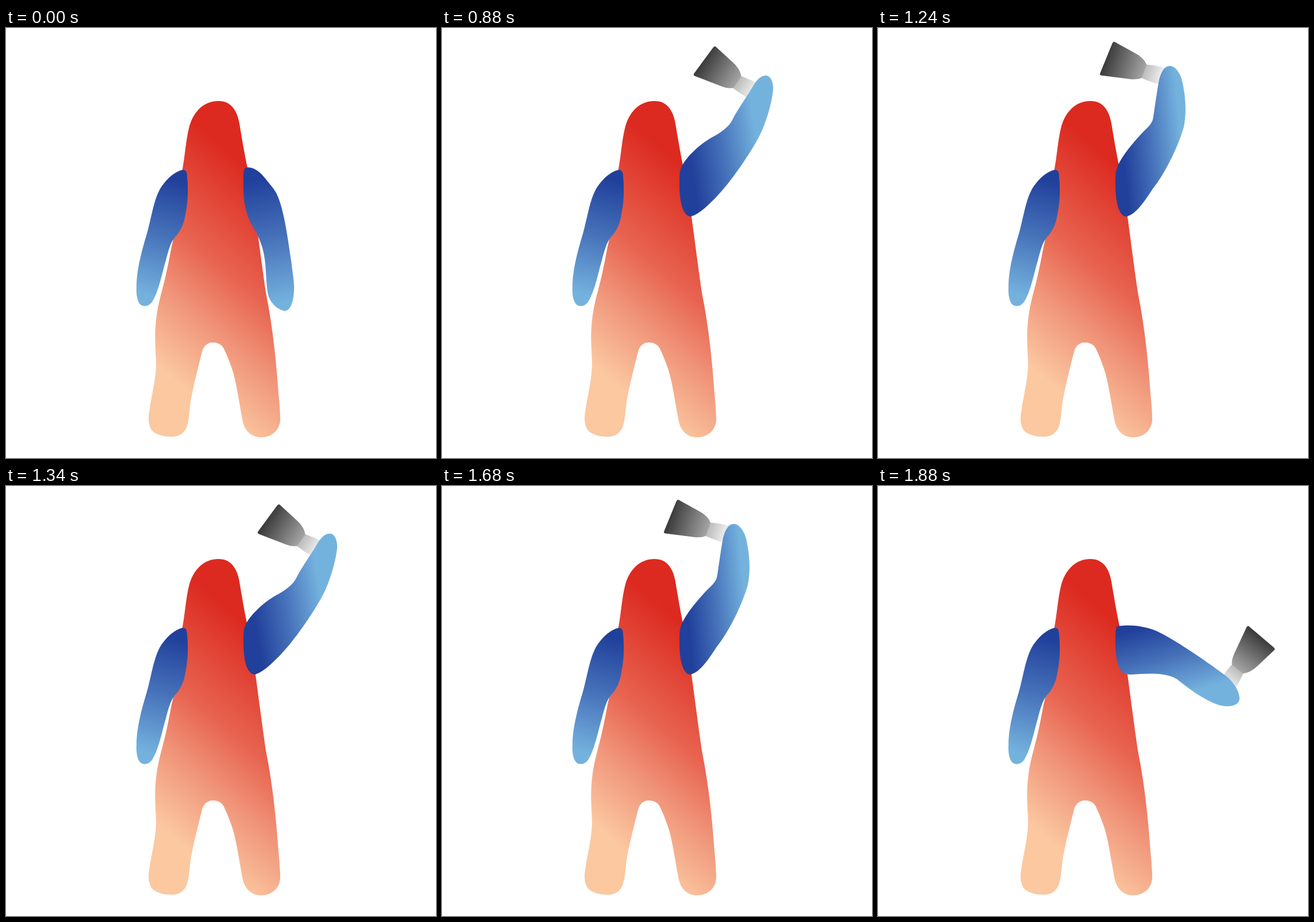
These frames come from a looping animation (748 px wide and 748 px high, 1.96 s). An HTML page:

```html
<!DOCTYPE html>
<html lang="en">
<head>
<meta charset="utf-8">
<title>Waving figure</title>
<style>
  html, body { margin: 0; width: 100%; height: 100%; overflow: hidden; background: #fff; }
  svg { display: block; width: 100vw; height: 100vh; }
</style>
</head>
<body>
<svg viewBox="0 0 748 748">
  <defs>
    <linearGradient id="bodyFill" gradientUnits="userSpaceOnUse" x1="370" y1="200" x2="134" y2="476">
      <stop offset="0" stop-color="#dc2a20"/>
      <stop offset=".45" stop-color="#e86551"/>
      <stop offset=".7" stop-color="#f0957a"/>
      <stop offset="1" stop-color="#fbc8a0"/>
    </linearGradient>
    <linearGradient id="blue">
      <stop offset="0" stop-color="#21409b"/>
      <stop offset=".5" stop-color="#4874bb"/>
      <stop offset="1" stop-color="#74b2de"/>
    </linearGradient>
    <linearGradient id="restingFill" href="#blue" gradientUnits="userSpaceOnUse" x1="300" y1="265" x2="245" y2="465"/>
    <linearGradient id="movingFill" href="#blue" gradientUnits="userSpaceOnUse"/>
    <linearGradient id="bladeFill" gradientUnits="userSpaceOnUse" x1="0" y1="0" x2="70" y2="5">
      <stop offset="0" stop-color="#3d3d3d"/>
      <stop offset="1" stop-color="#a6a6a6"/>
    </linearGradient>
    <linearGradient id="handleFill" gradientUnits="userSpaceOnUse" x1="66" y1="5" x2="100" y2="7">
      <stop offset="0" stop-color="#b8b8b8"/>
      <stop offset="1" stop-color="#efefef"/>
    </linearGradient>
  </defs>
  <path fill="url(#bodyFill)" d="M307 245C311 225 313 195 318 175C324 150 340 128 368 127C390 126 402 142 406 166C410 190 415 220 420 243L434 328C440 372 446 420 452 460C462 510 468 560 472 610C474 640 477 660 477 682C476 700 462 712 444 712C428 712 416 702 412 685C407 660 402 625 396 602C392 588 386 573 380 560C377 552 370 547 360 547C350 547 344 553 341 563C335 588 326 622 322 645C319 662 319 680 315 692C311 704 302 711 288 711C276 711 262 708 255 701C248 694 247 680 249 668C253 640 260 615 261 588C261 565 258 545 260 520C262 490 268 470 273 450C280 425 285 395 289 376C293 365 300 300 307 245Z"/>
  <path fill="url(#restingFill)" d="M306 247C312 246 315 250 315 258C317 280 317 300 312 325C309 343 303 354 293 365C284 376 281 395 275 415C269 438 264 460 255 475C250 483 243 485 237 483C229 480 226 465 227 450C227 420 237 385 245 358C251 338 256 305 265 286C274 266 293 250 306 247Z"/>
  <g id="tool">
    <path fill="url(#handleFill)" d="M66-6Q82-9 103-9V22Q80 21 66 18Z"/>
    <path fill="url(#bladeFill)" d="M7-31L45-21C57-18 65-13 70-6L67 18C62 22 55 24 47 25L-2 31Q-6 31-5 27L3-28Q4-32 7-31Z"/>
  </g>
  <path id="arm" fill="url(#movingFill)"/>
</svg>
<script>
const LOOP = 1960;
const shoulder = 'C418 326 413 300 413 272C413 258 413 249 416 243Z';

// shade: gradient x1 y1 x2 y2; tool: blade centre x, y and rotation
const poses = {
  rest: {
    shade: [430, 265, 472, 480],
    arm: 'M417 243C430 240 444 252 452 263C458 271 468 281 472 291C484 318 490 365 497 411C498 425 502 440 501 457C500 478 494 493 484 492C476 491 463 482 458 470C452 455 453 420 450 402C448 385 443 372 437 359C428 342 422 335 418 318C412 300 413 275 413 262C413 252 413 246 417 243Z'
  },
  side: {
    shade: [450, 250, 484, 375],
    tool: [666.5, 263.5, 122],
    arm: 'M417 244C440 240 470 244 492 256C520 270 570 304 605 330C622 343 632 365 628 374C624 383 608 386 590 380C565 371 540 352 520 336C500 324 470 326 440 328Q435 328 432 327' + shoulder
  },
  wide: {
    shade: [438, 266, 557, 246],
    tool: [456, 57, 28],
    arm: 'M416 243C422 228 445 204 470 190C485 182 499 172 505 160C512 145 530 120 540 103C546 92 555 81 565 83C573 84 577 98 576 108C573 135 562 170 550 192C530 228 500 270 478 293C462 310 444 326 432 328' + shoulder
  },
  raised: {
    shade: [430, 250, 532, 240],
    tool: [398, 53, 14],
    arm: 'M416 243C421 227 443 200 460 182C470 172 478 166 479 154C482 135 485 112 489 90C493 75 499 65 509 66C521 68 528 85 530 96C535 120 537 145 532 172C522 207 500 252 477 281C463 303 447 326 431 328' + shoulder
  },
  overhead: {
    shade: [424, 240, 508, 240],
    tool: [338, 79, 0],
    arm: 'M416 243C420 225 440 195 450 172C455 162 453 158 451 148C446 125 442 105 437 84C433 68 438 58 448 59C458 61 470 72 474 80C486 103 500 128 507 145C510 152 508 158 507 165C502 198 488 240 474 269C463 293 450 325 430 328' + shoulder
  }
};

const timeline = [
  [0, 'rest'], [800, 'side'], [880, 'wide'], [980, 'raised'], [1080, 'overhead'],
  [1240, 'raised'], [1340, 'wide'], [1440, 'raised'], [1540, 'overhead'],
  [1680, 'raised'], [1780, 'wide'], [1880, 'side']
];

const arm = document.getElementById('arm');
const tool = document.getElementById('tool');
const fill = document.getElementById('movingFill');
let shown;

function show(name) {
  if (name === shown) return;
  shown = name;
  const pose = poses[name];
  arm.setAttribute('d', pose.arm);
  ['x1', 'y1', 'x2', 'y2'].forEach((key, i) => fill.setAttribute(key, pose.shade[i]));
  tool.setAttribute('visibility', pose.tool ? 'visible' : 'hidden');
  if (pose.tool) {
    const [x, y, angle] = pose.tool;
    tool.setAttribute('transform', `translate(${x} ${y}) rotate(${angle})`);
  }
}

const start = performance.now();
function update(now) {
  const time = Math.max(0, now - start) % LOOP;
  show(timeline.findLast(([from]) => from <= time)[1]);
  requestAnimationFrame(update);
}
update(start);
</script>
</body>
</html>
```
